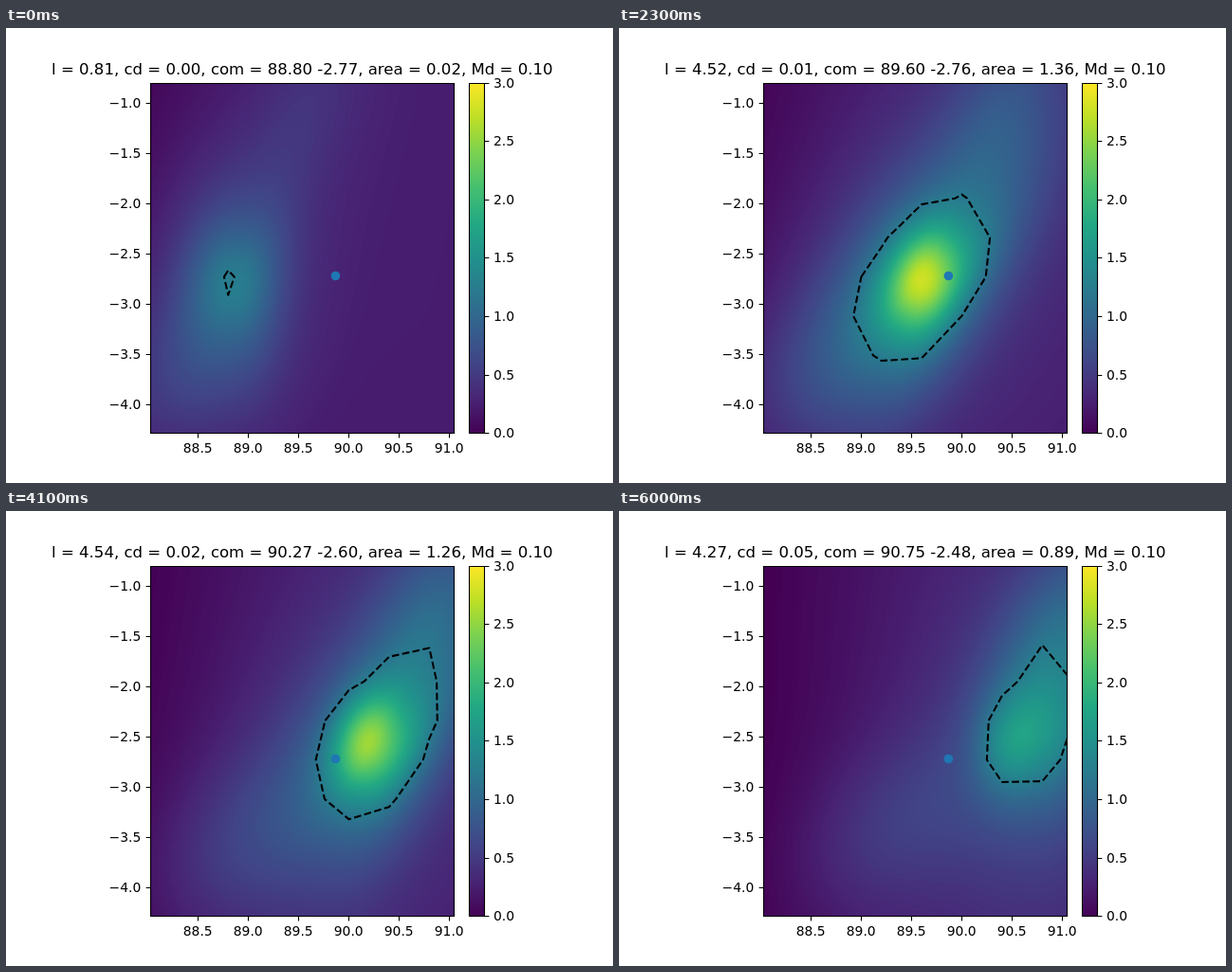
These frames come from a looping animation (640x480 px, 6100 ms). An HTML page with a canvas:

```html
<!DOCTYPE html>
<html lang="en">
<head>
<meta charset="utf-8">
<title>Drifting density field</title>
<style>
  html, body { margin: 0; width: 100%; height: 100%; overflow: hidden; background: #fff; }
  canvas, svg { position: absolute; left: 0; top: 0; width: 640px; height: 480px; }
  text { font: 13.89px "DejaVu Sans", sans-serif; }
  #title { font-size: 16.57px; text-anchor: middle; }
  .mid { text-anchor: middle; }
  .end { text-anchor: end; }
  path { stroke: #000; stroke-width: 1.1; fill: none; }
</style>
</head>
<body>
<canvas id="plot" width="640" height="480"></canvas>
<svg id="axes" viewBox="0 0 640 480">
  <path d="M152.5 58.5H472.5V427.5H152.5ZM488.5 58.5H504.5V427.5H488.5Z"/>
  <text id="title" x="312.3" y="49"></text>
</svg>
<script>
const LEFT = 152, TOP = 58, W = 320, H = 370;
const STEP = 100, LOOP = 6100, LEVEL = 1.2;
const VIRIDIS = ['440154', '482475', '414487', '355f8d', '2a788e', '21918c',
  '22a884', '44bf70', '7ad151', 'bddf26', 'fde725'];

// time, length, cd, lon, lat, area, body height, peak height, peak drop in px
const KEYS = [
  [0, 0.81, 0.00, 88.80, -2.77, 0.02, 1.08, 0.04, 3],
  [1400, 3.83, 0.00, 89.32, -2.76, 0.97, 1.54, 0.1, -9],
  [2300, 4.52, 0.01, 89.60, -2.76, 1.36, 1.95, 0.6, -3],
  [3400, 4.17, 0.00, 89.92, -2.71, 1.13, 1.66, 1.0, 0],
  [4100, 4.54, 0.02, 90.27, -2.60, 1.26, 1.6, 0.75, -9],
  [4800, 4.31, 0.01, 90.52, -2.55, 1.25, 1.5, 0.9, 13],
  [6000, 4.27, 0.05, 90.75, -2.48, 0.89, 1.15, 0.4, 9]
];

const lerp = (a, b, u) => a + (b - a) * u;
const mix = (a, b, u) => a.map((v, i) => lerp(v, b[i], u));
const toX = lon => 202.5 + (lon - 88.5) * 106;
const toY = lat => 79.5 - (lat + 1) * 106;

function keyAt(time) {
  let k = 0;
  while (k < KEYS.length - 2 && time >= KEYS[k + 1][0]) k++;
  const a = KEYS[k], b = KEYS[k + 1];
  return mix(a, b, (time - a[0]) / (b[0] - a[0]));
}

// Squared distances along and across an ellipse tilted from the vertical
function ellipse(cx, cy, long, short, tilt) {
  const s = Math.sin(tilt * Math.PI / 180), c = Math.cos(tilt * Math.PI / 180);
  return (x, y) => {
    const dx = x - cx, dy = y - cy;
    return [(dx * s - dy * c) / long, (dx * c + dy * s) / short];
  };
}

function gauss(h, ...shape) {
  const local = ellipse(...shape);
  return (x, y) => {
    const [p, q] = local(x, y);
    return h * Math.exp(-(p * p + q * q) / 2);
  };
}

// Long-tailed hump with a steeper right flank
function hump(h, ...shape) {
  const local = ellipse(...shape);
  return (x, y) => {
    const [p, q] = local(x, y);
    return h / (1 + p * p + (q > 0 ? q * q * q : q * q));
  };
}

// The body tilts over and back while a tail and a plume drift along with it
function makeField(u, cx, cy, body, peak, drop) {
  const tilt = 8 + 24 * Math.sin(Math.PI * u);
  const rise = Math.sin(Math.PI * u / 2);
  const parts = [
    hump(body, cx, cy, 86, 55, tilt),
    gauss(peak, cx + 5 - 40 * u * u, cy + drop, 36, 22, tilt / 2),
    gauss(0.3, 165 + 120 * u, 378 - 45 * u, 80, 55, 45),
    gauss(0.15 + 0.37 * rise, 320 + 150 * rise, 75 + 50 * u, 75, 40, 20)
  ];
  return (x, y) => {
    let v = 0.27 * Math.sin((x - LEFT) / W * Math.PI / 2) - 0.04;
    for (const part of parts) v += part(x, y);
    return v;
  };
}

// Level crossings on a coarse grid, ordered around the centre
function traceLevel(field, cx, cy) {
  const dx = 42.4, dy = 41.4, pts = [];
  const node = (i, j) => [234.3 + i * dx, 262.5 + j * dy];
  const cross = (p, q) => {
    const a = field(...p) - LEVEL, b = field(...q) - LEVEL;
    if (a * b < 0) pts.push(mix(p, q, a / (a - b)));
  };
  for (let i = -2; i <= 6; i++) {
    for (let j = -4; j <= 4; j++) {
      if (i < 6) cross(node(i, j), node(i + 1, j));
      if (j < 4) cross(node(i, j), node(i, j + 1));
    }
  }
  const angle = ([x, y]) => Math.atan2(y - cy, x - cx);
  return pts.sort((p, q) => angle(p) - angle(q));
}

const stops = VIRIDIS.map(h => [0, 2, 4].map(i => parseInt(h.slice(i, i + 2), 16)));
const palette = Array.from({ length: 256 }, (_, i) => {
  const p = i / 25.5, k = Math.min(9, Math.floor(p));
  return mix(stops[k], stops[k + 1], p - k);
});

const ctx = document.getElementById('plot').getContext('2d');
const title = document.getElementById('title');
const heat = document.createElement('canvas');
heat.width = W / 2;
heat.height = H / 2;
const heatCtx = heat.getContext('2d');
const pixels = heatCtx.createImageData(heat.width, heat.height);

function drawHeat(field) {
  let at = 0;
  for (let j = 0; j < heat.height; j++) {
    for (let i = 0; i < heat.width; i++) {
      const v = field(LEFT + 2 * i + 1, TOP + 2 * j + 1);
      const rgb = palette[Math.max(0, Math.min(255, Math.floor(v / 3 * 256)))];
      for (let k = 0; k < 3; k++) pixels.data[at++] = rgb[k];
      pixels.data[at++] = 255;
    }
  }
  heatCtx.putImageData(pixels, 0, 0);
  ctx.drawImage(heat, LEFT, TOP, W, H);
}

function drawOutline(pts) {
  ctx.beginPath();
  for (const [x, y] of pts) ctx.lineTo(x, y);
  ctx.closePath();
  ctx.setLineDash([7.71, 3.33]);
  ctx.lineWidth = 2.08;
  ctx.lineJoin = 'round';
  ctx.stroke();
}

function draw(time) {
  const [, len, cd, lon, lat, area, body, peak, drop] = keyAt(time);
  const cx = toX(lon), cy = toY(lat);
  const field = makeField(time / 6000, cx, cy, body, peak, drop);

  ctx.save();
  ctx.beginPath();
  ctx.rect(LEFT, TOP, W + 0.5, H - 0.5);
  ctx.clip();
  drawHeat(field);
  ctx.fillStyle = '#1f77b4';
  ctx.beginPath();
  ctx.arc(347.4, 261.5, 4.8, 0, 7);
  ctx.fill();
  drawOutline(traceLevel(field, cx, cy));
  ctx.restore();

  const f = v => v.toFixed(2);
  title.textContent =
    `l = ${f(len)}, cd = ${f(cd)}, com = ${f(lon)} ${f(lat)}, area = ${f(area)}, Md = 0.10`;
}

function drawAxes() {
  let ticks = '', labels = '';
  const label = (x, y, cls, s) => labels += `<text x="${x}" y="${y}" class="${cls}">${s}</text>`;
  for (let i = 0; i < 6; i++) {
    const x = 202.5 + 53 * i;
    ticks += `M${x} 427.5v4.9`;
    label(x - 0.3, 448, 'mid', (88.5 + i / 2).toFixed(1));
  }
  for (let i = 0; i < 7; i++) {
    const y = 79 + 53 * i, barY = Math.round(427.2 - 61.6 * i);
    ticks += `M152.5 ${y + 0.5}h-4.9M504.5 ${barY + 0.5}h4.9`;
    label(142.3, y + 5, 'end', '\u2212' + (1 + i / 2).toFixed(1));
    label(514, barY + 5, '', (i / 2).toFixed(1));
  }
  document.getElementById('axes').insertAdjacentHTML('beforeend', `<path d="${ticks}"/>${labels}`);

  const bar = ctx.createLinearGradient(0, TOP + H, 0, TOP);
  VIRIDIS.forEach((h, i) => bar.addColorStop(i / 10, '#' + h));
  ctx.fillStyle = bar;
  ctx.fillRect(488.5, TOP, 16, H - 0.5);
}

drawAxes();
const begin = performance.now();
let shown = -1;
function tick() {
  const t = Math.floor(((performance.now() - begin) % LOOP) / STEP) * STEP;
  if (t !== shown) draw(shown = t);
  requestAnimationFrame(tick);
}
tick();
</script>
</body>
</html>
```
